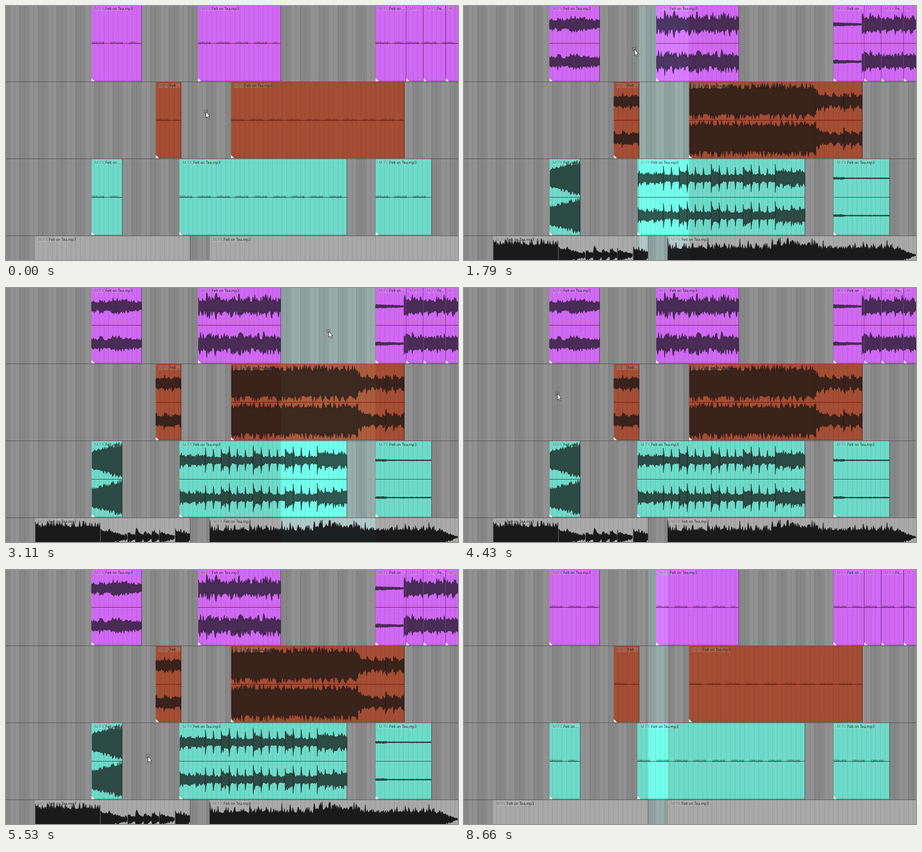
Animation, 998 px wide and 561 px high, one loop 8760 ms. Source, as an HTML page:

```html
<!DOCTYPE html>
<html lang="en">
<head>
<meta charset="utf-8">
<title>Timeline gaps</title>
<style>
  html, body { margin: 0; width: 100%; height: 100%; overflow: hidden; background: #8f8f8f; }
  svg { display: block; width: 100%; height: 100%; }
  text { font: 8.1px "Open Sans", "Noto Sans", sans-serif; white-space: pre; }
  .off text { font-size: 7.2px; }
  .button { font-size: 8.8px; text-anchor: middle; fill: #4b4b4b; fill-opacity: .72; }
  #sel { mix-blend-mode: color-dodge; fill: #0b2926; }
</style>
</head>
<body>
<svg id="stage" viewBox="0 0 998 561" preserveAspectRatio="none"></svg>
<script>
const W = 998, H = 561, LOOP = 8760;
const PITCH = 170, ROW = 168, GRID = 10.34, BEAT = 17.65;
const TITLE = 'Felt on Tea.mp3';
const stage = document.getElementById('stage');

function add(parent, tag, attrs = {}, text) {
  const el = document.createElementNS('http://www.w3.org/2000/svg', tag);
  for (const k in attrs) el.setAttribute(k, attrs[k]);
  if (text) el.textContent = text;
  parent.appendChild(el);
  return el;
}
const group = cls => add(stage, 'g', cls ? { class: cls } : {});
const rect = (p, x, y, width, height, fill, opacity = 1) =>
  add(p, 'rect', { x, y, width, height, fill, opacity });

let seed = 7;
function rnd() {
  seed = (seed * 1664525 + 1013904223) >>> 0;
  return seed / 4294967296;
}

const tracks = [
  { fill: '#d069f3', wave: '#492d56', line: '#850a3c', text: '#43204e' },
  { fill: '#a44e34', wave: '#39231b', line: '#7a0808', text: '#572517' },
  { fill: '#6edbc9', wave: '#2c4b45', line: '#1c3f3a', text: '#183a35' },
  { fill: '#a9a9a9', wave: '#1a1a1a', line: '#555', text: '#333' }
];
tracks.forEach((t, i) => { t.y = i * PITCH - 2; });

// Left and right edges of the clips on each track
const spans = [
  [[189, 300], [424, 607], [816, 884], [884, 922], [922, 971], [971, 999]],
  [[331, 387], [497, 880]],
  [[189, 257], [383, 753], [816, 940]],
  [[64, 407], [450, 1060]]
];
const clips = spans.flatMap((list, i) =>
  list.map(([x0, x1]) => ({ x0, x1, w: x1 - x0, ...tracks[i] })));

// Backdrop, clip bodies and grid
rect(stage, 0, 0, W, H, '#919191');
for (let x = -12.4; x < W; x += GRID * 4) rect(stage, x, 0, GRID * 2, H, '#878787');
const defs = add(stage, 'defs');
const bodies = group();
clips.forEach((c, i) => {
  const { x0, x1, w, y, fill } = c;
  rect(add(defs, 'clipPath', { id: 'clip' + i }), x0, y, w, ROW);
  c.mask = `url(#clip${i})`;
  rect(bodies, x0, y, w, ROW, fill);
  rect(bodies, x1 - 1, y, 1, ROW, '#000', .55);
  rect(bodies, x0, y + ROW - 1, w, 1, '#000', .3);
});
for (let x = 8.9; x < W; x += GRID) rect(stage, Math.round(x), 0, 1, H, '#000', .11);
for (const t of tracks.slice(1)) rect(stage, 0, t.y - 1, W, 1, '#4c4c4c');

// Waveforms: a loudness ramp, with decaying hits on the beat and thin kicks
const online = group();

function sound(track, x0, x1, from, to, { hit = 0, kick = 0, rough = .3 } = {}) {
  const { y, wave } = tracks[track];
  const power = Array.from({ length: 40 }, () => .4 + .6 * rnd());
  const loudness = x => {
    const beat = Math.floor((x - x0) / BEAT);
    const phase = (x - x0) / BEAT - beat;
    const base = from + (to - from) * (x - x0) / (x1 - x0) + hit * power[beat] * (1 - phase);
    return [base, kick * (.5 + power[beat] / 2) * Math.max(0, 1 - phase * 5)];
  };
  for (const cy of track === 3 ? [y + 42.5] : [y + 42.5, y + 125]) {
    const top = [], bottom = [];
    for (let x = x0; x <= x1; x += 1.5) {
      const [base, peak] = loudness(x);
      const size = () => Math.min(41, Math.max(peak, base * (1 - rough + 2 * rough * rnd() ** 2)));
      top.push(`${x} ${(cy - size()).toFixed(1)}`);
      bottom.unshift(`${x} ${(cy + size()).toFixed(1)}`);
    }
    add(online, 'path', {
      d: `M${top.concat(bottom).join('L')}Z`, fill: wave,
      stroke: '#120d12', 'stroke-opacity': .75, 'stroke-width': .9
    });
  }
}

sound(0, 189, 232, 9, 8, { hit: 6 });
sound(0, 232, 300, 16, 9);
sound(0, 425, 607, 13, 14, { hit: 12, rough: .4 });
sound(0, 816, 878, 4, 2);
sound(0, 879, 998, 13, 11, { hit: 10 });

sound(1, 331, 387, 10, 10, { hit: 8 });
sound(1, 498, 778, 34, 34, { rough: .22 });
sound(1, 778, 838, 12, 7, { hit: 10 });
sound(1, 838, 879, 8, 8, { hit: 15 });

sound(2, 190, 257, 20, 37, { rough: .15 });
sound(2, 384, 440, 9, 9, { hit: 6 });
sound(2, 440, 475, 8, 8, { kick: 30 });
for (let bar = 475; bar < 680; bar += BEAT * 4) {
  sound(2, bar, bar + 22, 19, 13, { kick: 33 });
  sound(2, bar + BEAT, bar + BEAT * 4, 9, 8, { kick: 33 });
}
sound(2, 687, 753, 13, 14, { kick: 33, hit: 6 });
sound(2, 816, 840, 2, 2);
sound(2, 840, 940, 1, 1);

sound(3, 65, 208, 28, 30, { rough: .25 });
sound(3, 209, 268, 18, 2, { hit: 5 });
sound(3, 269, 339, 5, 3, { hit: 17 });
sound(3, 339, 373, 13, 3);
sound(3, 374, 406, 18, 8);
sound(3, 450, 680, 17, 19, { kick: 38, hit: 5 });
sound(3, 680, 775, 30, 29, { kick: 36 });
sound(3, 775, 945, 18, 19, { kick: 36, hit: 6 });
sound(3, 945, 998, 20, 1);
for (const { x0 } of clips.slice(3, 6)) rect(online, x0 - 1, 0, 1, 166, '#7d3c94');

// Centre lines and fade handles
const trims = group();
for (const { x0, w, y, line } of clips) {
  rect(trims, x0, y + ROW / 2, w, 1, line);
  add(trims, 'path', { d: `M${x0} ${y + ROW - 6.5}v6.5h6.5z`, fill: '#fff' });
}

// Shorten text to the given number of letters
const cut = (s, n) => s.slice(0, n) + '...';

const offline = group('off');
for (const { x0, x1, y, text, mask } of clips) {
  const g = add(offline, 'g', { 'clip-path': mask, fill: text });
  for (let x = x0; x < x1 - 6; x += GRID * 4) {
    const room = x1 - x;
    const word = room < 29 ? cut('OFFLINE', Math.max(1, Math.floor((room - 8.5) / 3.5))) : 'OFFLINE';
    add(g, 'text', { x, y: y + ROW / 2 + 2.4 }, word);
  }
}

const labels = group();
for (const { x0, w, y, mask } of clips) {
  const g = add(labels, 'g', { 'clip-path': mask });
  const button = (x, width, s) => {
    rect(g, x, y + 3, width, 10, '#fff', .16);
    add(g, 'text', { class: 'button', x: x + width / 2, y: y + 11 }, s);
  };
  button(x0 + 6.5, 9, 'M');
  if (w > 30) button(x0 + 17.5, 10, 'FX');
  const room = w - 30;
  const letters = Math.round((room - 11.5) / 3.2);
  if (letters < 1) continue;
  const name = room < 62 ? cut(TITLE, letters) : TITLE;
  rect(g, x0 + 30, y + 3, Math.min(room - 2, 60), 10, '#fff', .14);
  add(g, 'text', { x: x0 + 30.5, y: y + 10.7, fill: '#111' }, name);
}

const sel = add(stage, 'rect', { id: 'sel', y: 0, height: H });
const cursor = group();
add(cursor, 'rect', { x: .5, y: .5, width: 7, height: 7, fill: 'none', stroke: '#222', 'stroke-dasharray': '1 1' });
add(cursor, 'path', {
  d: 'M4.5 4.5v13.6l3.1-2.9 2.3 5.2 2.2-1-2.3-5h3.4z',
  fill: '#fff', stroke: '#111', 'stroke-width': .9
});

// Pointer stops; "pick" is when the gap under the pointer gets selected
const STEP = 135, CLEAR = 150;
const stops = [
  { start: 0, end: 1, x: 437, y: 229 },
  { start: 120, end: 490, x: 443, y: 247, pick: 890 },
  { start: 1290, end: 1660, x: 372, y: 91, pick: 2040 },
  { start: 2430, end: 2740, x: 708, y: 91, pick: 3110 },
  { start: 3890, end: 4350, x: 202, y: 229, pick: 4580 },
  { start: 4980, end: 5450, x: 309, y: 407, pick: 5650 },
  { start: 6170, end: 6171, x: 337, y: 407 },
  { start: 6670, end: 7100, x: 429, y: 527, pick: 7320 },
  { start: 7700, end: 8250, x: 1000, y: 552 }
];
const picks = stops.filter(s => s.pick);

function pointerAt(t) {
  const i = stops.findLastIndex(s => s.start <= t);
  const { start, end, x, y } = stops[i];
  const from = stops[Math.max(0, i - 1)];
  const ticks = Math.floor((t - start) / STEP) + 1;
  const f = Math.min(1, ticks * STEP / (end - start));
  return [Math.round(from.x + (x - from.x) * f), Math.round(from.y + (y - from.y) * f)];
}

function gapAt({ x, y }) {
  const row = spans[Math.floor((y + 6) / PITCH)];
  return [
    Math.max(0, ...row.map(s => s[1]).filter(edge => edge <= x)),
    Math.min(W, ...row.map(s => s[0]).filter(edge => edge > x))
  ];
}

function selectionAt(t) {
  const i = picks.findLastIndex(s => s.pick <= t);
  const next = picks[i + 1];
  return i < 0 || (next && t >= next.pick - CLEAR) ? [0, 0] : gapAt(picks[i]);
}

function render(t) {
  const live = t >= 770 && t < 8660;
  online.style.display = live ? '' : 'none';
  offline.style.display = live ? 'none' : '';
  const [left, right] = selectionAt(t);
  sel.setAttribute('x', left);
  sel.setAttribute('width', right - left);
  cursor.setAttribute('transform', `translate(${pointerAt(t)})`);
}

const begin = performance.now();
function tick() {
  render((performance.now() - begin) % LOOP);
  requestAnimationFrame(tick);
}
tick();
</script>
</body>
</html>
```
